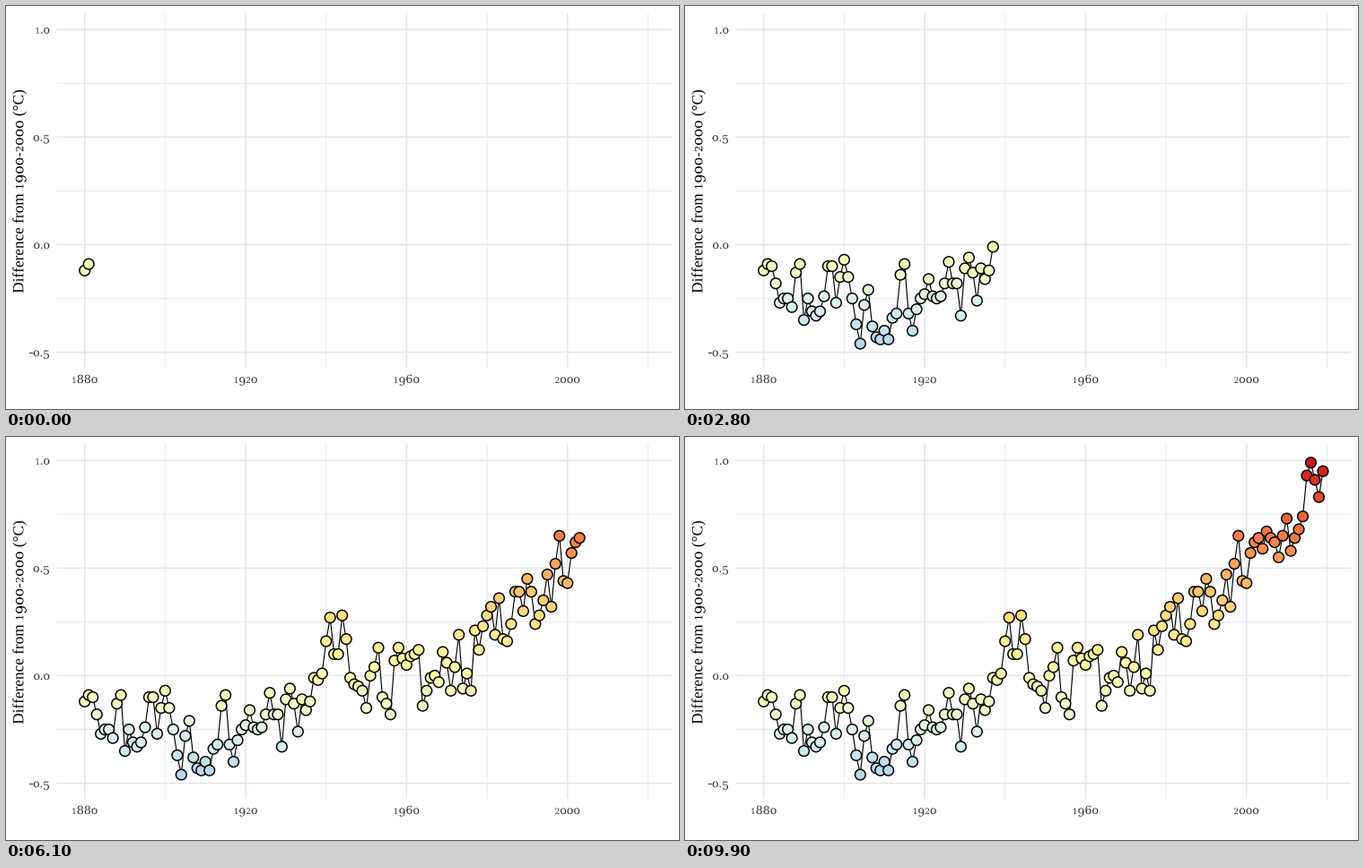
Recreate the animation shown at these times as a matplotlib script. Size 750 px wide and 450 px high, loop 10 s.

```python
import matplotlib.pyplot as plt
import numpy as np
from matplotlib.animation import FuncAnimation
from matplotlib.colors import LinearSegmentedColormap
from matplotlib.patches import PathPatch
from matplotlib.textpath import TextPath
from matplotlib.transforms import Affine2D

W, H, DPI = 750, 450, 100
PX = 72 / DPI  # one pixel in points
LEFT, RIGHT, TOP, BOTTOM = 56.5, 742, 8, 404
GRID = "#e7e7e7"

# Yearly anomaly from 1880 on, in hundredths of a degree
ANOMALY = np.array([
    -12, -9, -10, -18, -27, -25, -25, -29, -13, -9,
    -35, -25, -31, -33, -31, -24, -10, -10, -27, -15,
    -7, -15, -25, -37, -46, -28, -21, -38, -43, -44,
    -40, -44, -34, -32, -14, -9, -32, -40, -30, -25,
    -23, -16, -24, -25, -24, -18, -8, -18, -18, -33,
    -11, -6, -13, -26, -11, -16, -12, -1, -2, 1,
    16, 27, 10, 10, 28, 17, -1, -4, -5, -7,
    -15, 0, 4, 13, -10, -13, -18, 7, 13, 8,
    5, 9, 10, 12, -14, -7, -1, 0, -3, 11,
    6, -7, 4, 19, -6, 1, -7, 21, 12, 23,
    28, 32, 19, 36, 17, 16, 24, 39, 39, 30,
    45, 39, 24, 28, 35, 47, 32, 52, 65, 44,
    43, 57, 62, 64, 59, 67, 64, 62, 55, 65,
    73, 58, 64, 68, 74, 93, 99, 91, 83, 95]) / 100

LOW, HIGH = -0.46, 0.99
STOPS = [(-0.46, "#b5d7e8"), (-0.33, "#d4ecf2"), (-0.25, "#e0f3e6"),
         (-0.12, "#f5fac2"), (0.06, "#fffba6"), (0.28, "#fedc82"),
         (0.45, "#fdb768"), (0.65, "#f67c48"), (0.83, "#e44a2c"),
         (0.99, "#c9171d")]
cmap = LinearSegmentedColormap.from_list(
    "heat", [((v - LOW) / (HIGH - LOW), c) for v, c in STOPS], N=512)


def px_x(year):
    return 87.7 + (year - 1880) * 4.4835


def px_y(value):
    return 266.5 - value * 240.3


def glyph(char):
    """Character, font, scale and drop that give old-style numerals."""
    if not char.isdigit():
        return char, "Liberation Serif", 1.07, 0
    if char == "0":
        return "o", "DejaVu Serif", 0.98, 0
    if char in "12":
        return char, "DejaVu Serif", 0.7, 0
    return char, "DejaVu Serif", 0.98, 0 if char in "68" else 0.2


def advance(char, font, size):
    def end(s):
        return TextPath((0, 0), s, size=size, prop={"family": font}).get_extents().x1
    return end(f"|{char}|") - end("||")


def label(text, x, y, size, align=0.5, color="#333333", angle=0):
    parts, pos = [], 0
    for ch in text:
        char, font, scale, drop = glyph(ch)
        if char != " ":
            parts.append(TextPath((pos, -drop * size), char, size=size * scale,
                                  prop={"family": font}))
        pos += advance(char, font, size * scale)
    place = (Affine2D().translate(-align * pos, 0).scale(1, -1)
             .rotate_deg(-angle).translate(x, y))
    for path in parts:
        ax.add_patch(PathPatch(path, fc=color, lw=0,
                               transform=place + ax.transData))


def grid_line(xs, ys, width):
    ax.plot(xs, ys, color=GRID, lw=width * PX, snap=False,
            solid_capstyle="butt", zorder=0)


fig = plt.figure(figsize=(W / DPI, H / DPI), dpi=DPI, facecolor="white")
ax = fig.add_axes([0, 0, 1, 1])
ax.set_xlim(0, W)
ax.set_ylim(H, 0)
ax.axis("off")
ax.set_autoscale_on(False)

MINOR, MAJOR = 0.85, 1.6
for value in (-0.25, 0.25, 0.75):
    grid_line([LEFT, RIGHT], [px_y(value)] * 2, MINOR)
for year in (1900, 1940, 1980, 2020):
    grid_line([px_x(year)] * 2, [TOP, BOTTOM], MINOR)
for value in (-0.5, 0, 0.5, 1):
    grid_line([LEFT, RIGHT], [px_y(value)] * 2, MAJOR)
    label(f"{value:.1f}", 49, px_y(value) + 4.5, 12.8, align=1)
for year in (1880, 1920, 1960, 2000):
    grid_line([px_x(year)] * 2, [TOP, BOTTOM], MAJOR)
    label(str(year), px_x(year), 421, 12.8)
label("Difference from 1900-2000 (°C)", 19.3, 207, 16.1,
      color="black", angle=90)

xs = px_x(1880 + np.arange(len(ANOMALY)))
ys = px_y(ANOMALY)
points = np.column_stack([xs, ys])
line, = ax.plot([], [], color="black", lw=1.15 * PX, zorder=2)
dots = ax.scatter(xs[:2], ys[:2], c=ANOMALY[:2], cmap=cmap, vmin=LOW, vmax=HIGH,
                  s=(11.7 * PX) ** 2, edgecolors="black",
                  linewidths=1.5 * PX, zorder=3)


def update(frame):
    n = min(2 * frame + 2, len(points))  # two years per step, then hold
    line.set_data(xs[:n], ys[:n])
    dots.set_offsets(points[:n])
    dots.set_array(ANOMALY[:n])
    return line, dots


anim = FuncAnimation(fig, update, frames=100, interval=100,
                     repeat=True, repeat_delay=0)
plt.show()
```
